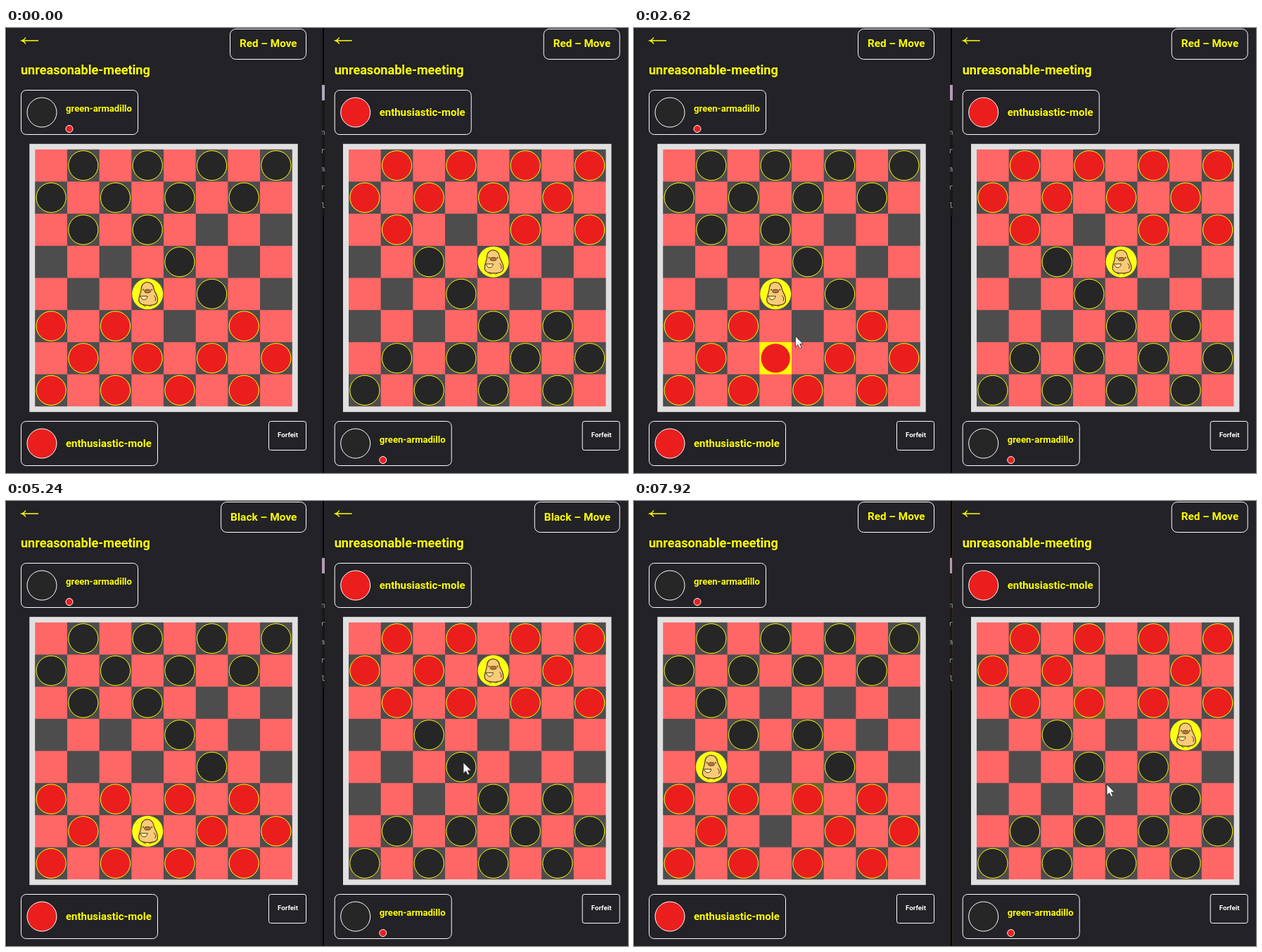
Animation of 884x633 px, one loop 7990 ms. Source, as an HTML page with a canvas:

```html
<!DOCTYPE html>
<html lang="en">
<head>
<meta charset="utf-8">
<title>Duck checkers</title>
<style>
html, body { margin: 0; height: 100%; overflow: hidden; background: #222227; }
canvas { display: block; }
</style>
</head>
<body>
<canvas id="stage" width="884" height="633"></canvas>
<script>
const ctx = document.getElementById('stage').getContext('2d');
const LOOP = 7990, SHIFT = 445.7, LEFT = 41.3, TOP = 172.8, CELL = 45.68, PRESS = 370;
const YELLOW = '#ffff00', RED = '#eb1e1e', BLACK = '#262626', BROWN = '#55381a';
const PLAYERS = {
  b: { name: 'green-armadillo', color: BLACK, width: 94, scored: true },
  r: { name: 'enthusiastic-mole', color: RED, width: 122, scored: false }
};
const STATUS = ['Red – Move', 'Red – Place Duck', 'Black – Move', 'Black – Place Duck'];

const START = ['.b.b.b.b', 'b.b.b.b.', '.b.b....', '....b...',
               '...D.b..', 'r.r...r.', '.r.r.r.r', 'r.r.r.r.'];

// Squares are [column, row]; view 1 is the turned board on the right.
const TURNS = [
  { pick: 2190, at: 2860, from: [3, 6], to: [4, 5], view: 0 },
  { at: 4220, from: [3, 4], to: [3, 6], view: 0 },
  { pick: 5990, at: 6750, from: [3, 2], to: [2, 3], view: 1 },
  { at: 7500, from: [3, 6], to: [1, 4], view: 1 }
];
const CLICKS = TURNS.flatMap(turn => [turn.pick, turn.at]).filter(Boolean);

const turned = (square, view) => view ? square.map(v => 7 - v) : square;
const same = (a, b) => a[0] === b[0] && a[1] === b[1];

function center([col, row]) {
  return [LEFT + (col + 0.5) * CELL, TOP + (row + 0.5) * CELL];
}

// The pointer visits each clicked square, wandering between them: [time, x, y].
const PATH = TURNS.map(({ at, to, view }) => {
  const [x, y] = center(turned(to, view));
  return [at, x + view * SHIFT, y];
}).concat([
  [910, 346, 572], [1400, 260, 398], [1870, 189, 434], [2190, 198, 464],
  [3300, 303, 395], [3600, 349, 340], [4610, 231, 473], [5030, 600, 320],
  [5240, 650, 372], [5640, 650, 372], [5990, 678, 403], [6330, 678, 403],
  [7150, 774, 360], [7920, 672, 403]
]).sort((a, b) => a[0] - b[0]);

const POINTER = new Path2D('M0 0V15.5L3.6 12.2 6 17.5 8.6 16.4 6.3 11.2H11Z');
const ARROW = new Path2D('M46 18H22.5M28 13.5Q26 17 22.5 18Q26 19 28 22.5');
const DUCK = new Path2D('M-9-7C-9-20 8-20 9-7C10-2 16 3 14 11C12 18-9 18-12 11C-14 5-9-1-9-7Z');
const MUG = new Path2D('M-11 3H0Q-1 9-7 8Z');
const LINES = new Path2D('M9 2Q13 5 11 10M-7 15L-3 18M3 18L7 15');

function paint(path, fill, stroke, width = 1) {
  ctx.lineWidth = width;
  ctx.fillStyle = fill;
  ctx.strokeStyle = stroke;
  if (fill) ctx.fill(path);
  if (stroke) ctx.stroke(path);
}

function oval(x, y, rx, ry, fill, stroke) {
  const path = new Path2D();
  path.ellipse(x, y, rx, ry, 0, 0, Math.PI * 2);
  paint(path, fill, stroke);
}

const disc = (x, y, r, fill, stroke) => oval(x, y, r, r, fill, stroke);

function rect(x, y, w, h, fill) {
  ctx.fillStyle = fill;
  ctx.fillRect(x, y, w, h);
}

function box(x, y, w, h, r) {
  const path = new Path2D();
  path.roundRect(x, y, w, h, r);
  paint(path, null, '#fff');
}

// Picks the largest font size up to max whose line fits the room.
function label(str, x, y, room, max, color = YELLOW) {
  const font = size => `bold ${size}px Roboto, "Liberation Sans", sans-serif`;
  ctx.font = font(max);
  ctx.font = font(Math.min(max, max * room / ctx.measureText(str).width));
  ctx.textBaseline = 'middle';
  ctx.fillStyle = color;
  ctx.fillText(str, x, y);
}

function duck(x, y) {
  ctx.save();
  ctx.translate(x, y);
  disc(0, 0, 22, '#ffff14');
  paint(DUCK, '#f9cb78', BROWN, 1.2);
  oval(0, -4, 4.5, 2.3, '#b87a3c', BROWN);
  disc(-6, -6, 1, BROWN);
  disc(6, -6, 1, BROWN);
  paint(MUG, '#fff1a0', BROWN);
  paint(LINES, null, BROWN);
  ctx.restore();
}

function boardAt(t) {
  const cells = START.map(row => [...row]);
  for (const { at, from: [c, r], to: [toC, toR] } of TURNS) {
    if (t < at) break;
    cells[toR][toC] = cells[r][c];
    cells[r][c] = '.';
  }
  return cells;
}

function darkSquare(t, view, square) {
  const picked = TURNS.some(turn =>
    turn.view === view && t >= turn.pick && t < turn.at && same(turn.from, square));
  if (picked) return YELLOW;
  return t >= TURNS[3].at && same(TURNS[0].to, square) ? '#65642f' : '#4d4d4d';
}

function drawBoard(t, view) {
  const cells = boardAt(t), size = 8 * CELL;
  rect(LEFT - 8, TOP - 8, size + 16, size + 16, '#e0e0e0');
  rect(LEFT, TOP, size, size, '#ff6666');
  for (let row = 0; row < 8; row++) {
    for (let col = 1 - row % 2; col < 8; col += 2) {
      const square = turned([col, row], view);
      const piece = cells[square[1]][square[0]];
      const [x, y] = center([col, row]);
      rect(x - CELL / 2, y - CELL / 2, CELL, CELL, darkSquare(t, view, square));
      if (piece === 'D') duck(x, y);
      else if (piece !== '.') disc(x, y, 21.1, PLAYERS[piece].color, YELLOW);
    }
  }
}

function drawPlayer({ name, color, width, scored }, y) {
  box(21.5, y, width + 72, 63, 7);
  disc(51, y + 31.5, 21, color, '#fff');
  label(name, 85, y + (scored ? 27 : 32), width, 16);
  if (scored) disc(90, y + 55, 5, RED, '#fff');
}

function drawWindow(t, view) {
  ctx.save();
  ctx.translate(view * SHIFT, 0);
  paint(ARROW, null, YELLOW, 1.5);

  const status = STATUS[TURNS.filter(turn => t >= turn.at).length % 4];
  const width = 17 + 6.45 * status.length;
  box(400 - width, 1.5, width + 26.5, 43, 8);
  ctx.textAlign = 'center';
  label(status, 413.5 - width / 2, 23, width, 22);
  ctx.textAlign = 'left';
  label('unreasonable-meeting', 21, 61, 184, 26);

  drawPlayer(view ? PLAYERS.r : PLAYERS.b, 88.5);
  drawPlayer(view ? PLAYERS.b : PLAYERS.r, 559.5);
  box(373.5, 559.5, 53, 41, 3);
  label('Forfeit', 386, 579.5, 29, 12, '#fff');
  drawBoard(t, view);
  ctx.restore();
}

// The sliver of another window visible between the two pages.
function drawGap(t) {
  ctx.save();
  ctx.beginPath();
  ctx.rect(449, 0, 4, 633);
  ctx.clip();
  rect(450, 0, 2, 633, '#050505');
  rect(449, 78, 4, 190, '#18181a');
  rect(449, 81, 4, 22, t < 2490 ? '#a9abbd' : '#b49bb8');
  if (t >= 6330) rect(452, 0, 1, 633, '#37291c');
  ctx.font = '10px "Liberation Mono", monospace';
  ctx.fillStyle = '#a5a5a5';
  [...'nrarl'].forEach((letter, i) => ctx.fillText(letter, 447.5, 152 + 26 * i));
  ctx.restore();
}

function drawPointer(t) {
  const next = PATH.findIndex(key => key[0] > t);
  if (next === 0) return;
  const b = PATH.at(next), a = next < 0 ? b : PATH[next - 1];
  const k = (t - a[0]) / (b[0] - a[0] || Infinity);
  ctx.save();
  ctx.translate(a[1] + (b[1] - a[1]) * k, a[2] + (b[2] - a[2]) * k);
  if (CLICKS.some(at => t >= at && t < at + PRESS)) disc(0, 1, 9.5, 'rgba(255,200,0,.7)');
  paint(POINTER, '#fff', '#333', 0.9);
  ctx.restore();
}

function frame(now) {
  const t = now % LOOP;
  rect(0, 0, 884, 633, '#222227');
  rect(0, 0, 1, 633, '#111114');
  drawWindow(t, 0);
  drawWindow(t, 1);
  drawGap(t);
  drawPointer(t);
  requestAnimationFrame(frame);
}
requestAnimationFrame(frame);
</script>
</body>
</html>
```
